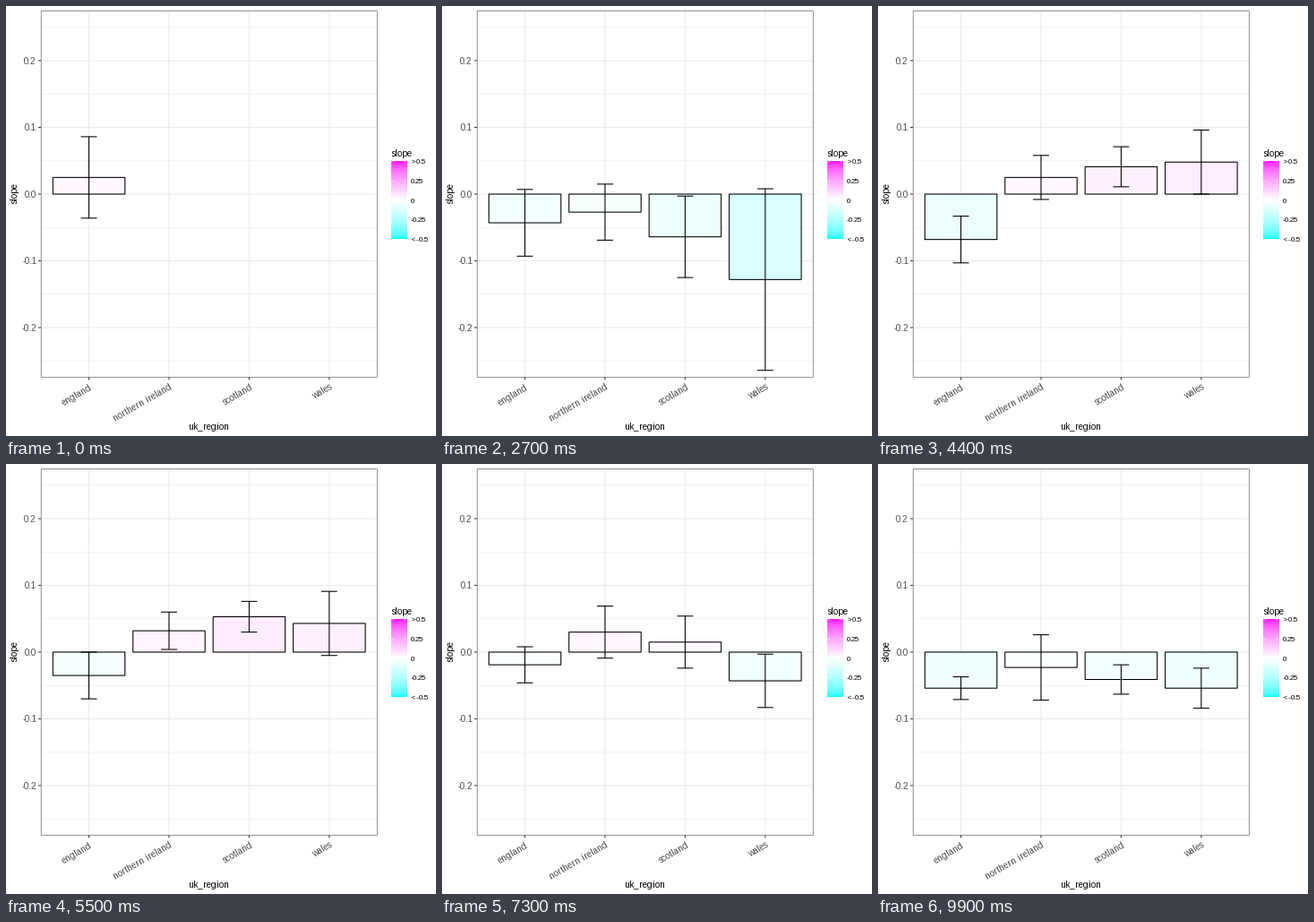
Write a matplotlib script that moves like this. It is 480 px wide and 480 px high and loops after 10000 ms.

```python
import numpy as np
import matplotlib.pyplot as plt
from matplotlib.animation import FuncAnimation
from matplotlib.patches import Rectangle

SIZE, DPI, FRAMES = 480, 100, 100
PX = 72 / DPI
LEFT, TOP, RIGHT, BOTTOM = 38.9, 5.48, 414.5, 414.5
ZERO, UNIT = (TOP + BOTTOM) / 2, 745
STEP = (RIGHT - LEFT) / 4.2
LINE = 1.07

# Slopes and interval half widths at the key times, in thousandths.
# A region that joins later has values for the last key times only.
KEYS = np.array([0, 14, 27, 44, 55, 73, 99])
REGIONS = [
    ("england", 0, [25, -30, -43, -68, -35, -19, -54],
     [61, 53, 50, 35, 35, 27, 17]),
    ("northern ireland", 22, [-27, 25, 32, 30, -23], [42, 33, 28, 39, 49]),
    ("scotland", 12, [-157, -64, 41, 53, 15, -41], [58, 61, 30, 23, 39, 22]),
    ("wales", 22, [-128, 48, 43, -43, -54], [136, 48, 48, 40, 30]),
]

TO_XYZ = np.array([[.4124, .3576, .1805],
                   [.2126, .7152, .0722],
                   [.0193, .1192, .9505]])
WHITE = TO_XYZ.sum(axis=1)


def slope_colour(v):
    """Cyan - white - magenta, mixed in Lab space."""
    end = (1, 0, 1) if v > 0 else (0, 1, 1)
    t = min(abs(v) / .5, 1)
    root = 1 - t + t * np.cbrt(TO_XYZ @ end / WHITE)
    lin = np.clip(np.linalg.solve(TO_XYZ, root ** 3 * WHITE), 0, 1)
    rgb = np.where(lin <= .0031308, 12.92 * lin, 1.055 * lin ** (1 / 2.4) - .055)
    return np.clip(rgb, 0, 1)


def smooth(frame, times, values):
    """Cubic Hermite curve through the points, straight before the first."""
    m = np.gradient(values, times)
    if frame < times[0]:
        return values[0] + m[0] * (frame - times[0])
    i = min(np.searchsorted(times, frame, "right"), len(times) - 1) - 1
    h = times[i + 1] - times[i]
    u = (frame - times[i]) / h
    rise = values[i + 1] - values[i]
    return (values[i] + rise * u * u * (3 - 2 * u)
            + h * u * (1 - u) * (m[i] * (1 - u) - m[i + 1] * u))


def x_of(i):
    return LEFT + (i + .6) * STEP


def y_of(v):
    return ZERO - v * UNIT


plt.rcParams.update({"font.family": "Liberation Sans", "path.snap": False,
                     "text.hinting_factor": 1})
fig = plt.figure(figsize=(SIZE / DPI, SIZE / DPI), dpi=DPI, facecolor="white")
ax = fig.add_axes([0, 0, 1, 1])
ax.axis("off")


def line(xs, ys, colour, width=LINE, z=1):
    return ax.plot(xs, ys, color=colour, lw=width * PX, zorder=z,
                   solid_capstyle="butt")[0]


def label(x, y, text, size=10, colour="black", **kw):
    kw = {"ha": "left", "va": "center_baseline", **kw}
    ax.text(x, y, text, fontsize=size * PX, color=colour, **kw)


def grid_and_axes():
    for v in np.arange(-.25, .26, .1):
        line([LEFT, RIGHT], [y_of(v)] * 2, "#ebebeb", LINE / 2)
    for v in np.arange(-2, 3) / 10:
        y = y_of(v)
        line([LEFT, RIGHT], [y, y], "#ebebeb")
        line([LEFT - 2.74, LEFT], [y, y], "#333333")
        label(34.2, y, f"{v:.1f}", colour="#4d4d4d", ha="right")
    for i, (name, *_) in enumerate(REGIONS):
        x = x_of(i)
        line([x, x], [TOP, BOTTOM], "#ebebeb")
        line([x, x], [BOTTOM, BOTTOM + 2.74], "#333333")
        label(x + 4.3, 427.3, name, colour="#4d4d4d", rotation=30,
              rotation_mode="anchor", ha="right", va="baseline")
    edge = LINE / 2
    ax.add_patch(Rectangle((LEFT + edge / 2, TOP + edge / 2),
                           RIGHT - LEFT - edge, BOTTOM - TOP - edge,
                           fill=False, ec="#333333", lw=edge * PX, zorder=6))
    label(226.7, 473, "uk_region", ha="center", va="baseline")
    label(13, ZERO, "slope", rotation=90, rotation_mode="anchor",
          ha="center", va="baseline")


def legend():
    x0, x1, y0, y1 = 429.9, 447.2, 173.9, 260.3
    label(x0, 168, "slope", va="baseline")
    ramp = np.array([[slope_colour(v)] for v in np.linspace(.5, -.5, 300)])
    ax.imshow(ramp, extent=(x0, x1, y1, y0), aspect="auto", zorder=2)
    for y, text in zip(np.linspace(y0, y1, 5),
                       [">0.5", "0.25", "0", "-0.25", "<-0.5"]):
        line([x0, x0 + 3.5], [y, y], "white", .5, 3)
        line([x1 - 3.5, x1], [y, y], "white", .5, 3)
        label(452, y, text, 8)


class Bar:
    def __init__(self, i, start, means, halves):
        self.start = start
        self.times = KEYS[-len(means):]
        self.means, self.halves = np.array([means, halves]) / 1000
        x, w, cap = x_of(i), .9 * STEP, .1 * STEP
        self.box = Rectangle((x - w / 2, ZERO), w, 0, ec="black",
                             lw=LINE * PX, zorder=3, joinstyle="miter")
        ax.add_patch(self.box)
        self.top = line([x - cap, x + cap], [ZERO] * 2, "black", z=4)
        self.bottom = line([x - cap, x + cap], [ZERO] * 2, "black", z=4)
        self.stem = line([x, x], [ZERO] * 2, "black", z=4)
        self.parts = [self.box, self.top, self.bottom, self.stem]
        panel = Rectangle((LEFT, TOP), RIGHT - LEFT, BOTTOM - TOP,
                          transform=ax.transData)
        for part in self.parts:
            part.set_clip_path(panel)

    def show(self, frame):
        mean = smooth(frame, self.times, self.means)
        half = smooth(frame, self.times, self.halves)
        hi, lo = y_of(mean + half), y_of(mean - half)
        self.box.set_height(y_of(mean) - ZERO)
        self.box.set_facecolor(slope_colour(mean))
        self.top.set_ydata([hi, hi])
        self.bottom.set_ydata([lo, lo])
        self.stem.set_ydata([hi, lo])
        for part in self.parts:
            part.set_visible(frame >= self.start)


grid_and_axes()
legend()
ax.set(xlim=(0, SIZE), ylim=(SIZE, 0))
bars = [Bar(i, *data) for i, (_, *data) in enumerate(REGIONS)]


def update(frame):
    for bar in bars:
        bar.show(frame)
    return [part for bar in bars for part in bar.parts]


anim = FuncAnimation(fig, update, frames=FRAMES, interval=100, repeat=True,
                     repeat_delay=0, init_func=lambda: update(0))
plt.show()
```
